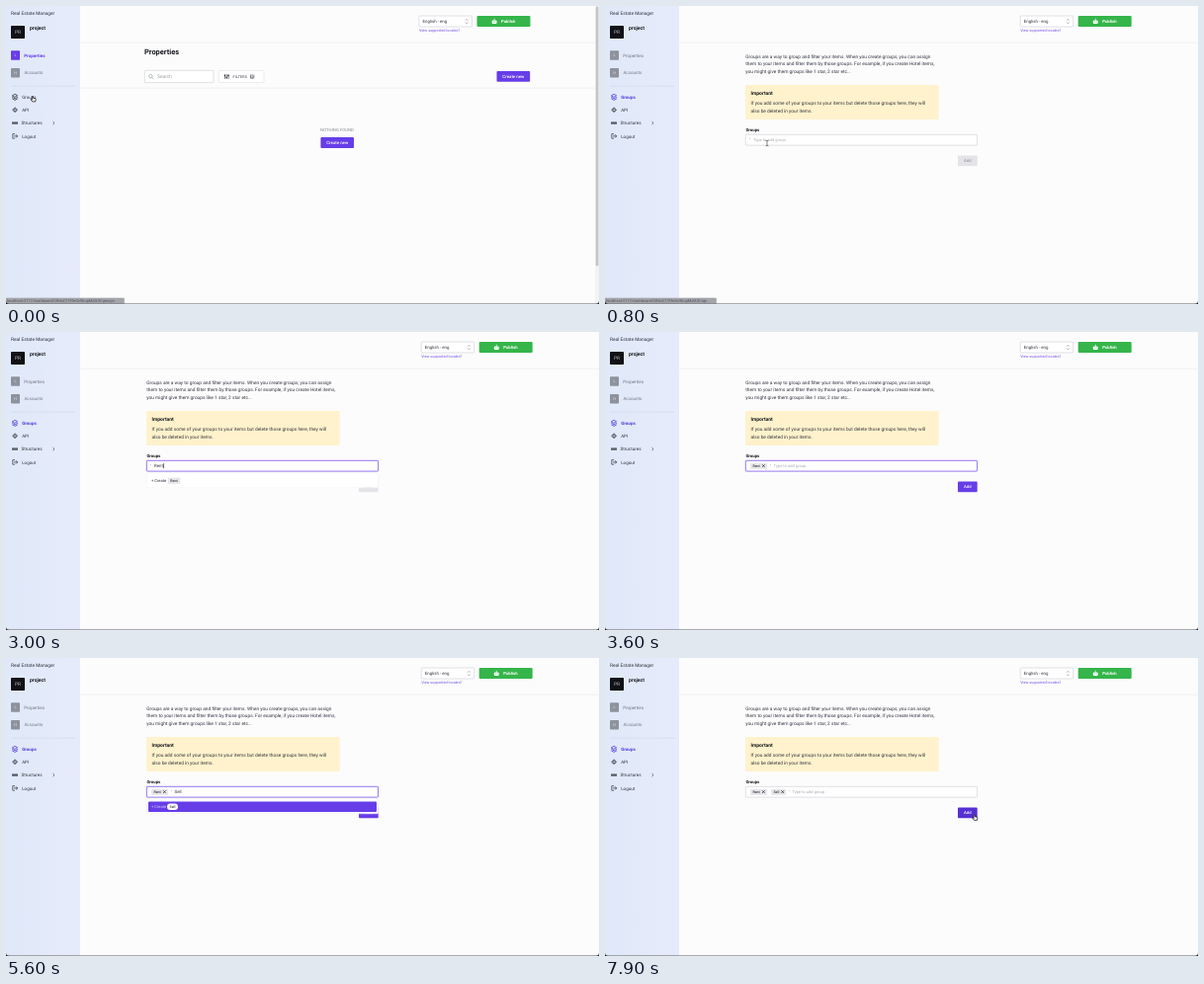
Recreate the animation shown at these times as an HTML page. Size 600 by 302 pixels, loop 8 s.

```html
<!DOCTYPE html>
<html lang="en">
<head>
<meta charset="utf-8">
<title>Group manager</title>
<style>
  html, body { margin: 0; width: 100%; height: 100%; overflow: hidden; background: #fcfcfd; }
  svg { display: block; width: 100vw; height: 100vh; }
  text { font-family: Roboto, Arial, sans-serif; text-rendering: geometricPrecision; white-space: pre; }
</style>
</head>
<body>
<svg id="stage" viewBox="0 0 600 302" xmlns="http://www.w3.org/2000/svg"></svg>
<script>
const LOOP = 8000;
const PURPLE = '#673de8', INK = '#30333b', GREY = '#6f7580', LINE = '#d3d5da';

// Markup helpers
const attrs = o => Object.entries(o).map(([k, v]) => ` ${k}="${v}"`).join('');
const rect = (x, y, width, height, fill, more = {}) =>
  `<rect${attrs({ x, y, width, height, fill, ...more })}/>`;
const text = (x, y, size, str, fill = INK, weight = 400, more = {}) =>
  `<text${attrs({ x, y, 'font-size': size, fill, 'font-weight': weight, ...more })}>${str}</text>`;
const path = (d, stroke = INK, width = 0.7, fill = 'none') =>
  `<path${attrs({ d, stroke, 'stroke-width': width, fill, 'stroke-linejoin': 'round', 'stroke-linecap': 'round' })}/>`;
const group = (id, body) => `<g id="${id}">${body}</g>`;
const outlined = (x, y, w, h, id) =>
  rect(x, y, w, h, '#fff', { stroke: LINE, 'stroke-width': 0.7, rx: 0.8, ...(id && { id }) });
const mid = { 'text-anchor': 'middle' };

const button = (x, y, w, h, label, fill = PURPLE) =>
  rect(x, y, w, h, fill, { rx: 1 }) +
  text(x + w / 2, y + h / 2 + 1.5, 4.4, label, '#fff', 500, mid);

const tile = (id, y, letter, fill) =>
  rect(5, y, 9, 9.5, fill, { rx: 0.8, id }) +
  text(9.5, y + 6.1, 3.8, letter, '#e4e4ee', 400, mid);

const chip = (id, x, w, label) => group(id,
  rect(x, 132.7, w, 6.2, '#e8e8ec', { rx: 1 }) +
  text(x + 2.4, 137.1, 3.6, label, INK, 500) +
  path(`M${x + w - 4.6} 134.6l2 2m0 -2l-2 2`, '#222', 0.75));

const sidebar =
  rect(0, 0, 75, 302, 'url(#side)') +
  text(5, 8.8, 4.8, 'Real Estate Manager') +
  rect(5, 20, 14, 13, '#111216', { rx: 0.8 }) +
  text(12, 28.3, 4.8, 'PR', '#b9bac0', 400, mid) +
  text(24, 23.8, 5.1, 'project', '#16181d', 700) +
  tile('propTile', 45.2, 'L', PURPLE) +
  text(18.2, 51.7, 4.55, 'Properties', PURPLE, 700, { id: 'propText' }) +
  tile('accTile', 63, 'H', '#8d929c') +
  text(18.4, 69.4, 4.5, 'Accounts', GREY) +
  rect(5, 80.8, 65, 0.5, '#cbd1e2') +
  group('groupIcon', path('M6.6 90.7l2.5 -1.4l2.5 1.4l-2.5 1.4zM6.6 92.4l2.5 1.4l2.5 -1.4M6.6 94l2.5 1.4l2.5 -1.4', 'currentColor', 0.8)) +
  text(16.2, 94, 4.5, 'Groups', INK, 400, { id: 'groupText' }) +
  path('M8.2 103.9l.9 -1.2l.9 1.2zM8.2 106.7l.9 1.2l.9 -1.2zM7.7 104.4l-1.2 .9l1.2 .9zM10.5 104.4l1.2 .9l-1.2 .9z', INK, 0.6) +
  text(16.2, 107, 4.5, 'API') +
  [6.3, 8.3, 10.3].map(x => rect(x, 117.4, 1.4, 2.4, '#24262c')).join('') +
  text(15.5, 120.2, 4.6, 'Structures') +
  path('M47.9 117.5l1.1 1.1l-1.1 1.1', INK, 0.7) +
  path('M8.6 129.6h-1.8v4.6h1.8M8.3 131.9h3.3m-1.3 -1.4l1.4 1.4l-1.4 1.4', INK, 0.7) +
  text(16.2, 133.6, 4.5, 'Logout');

const header =
  rect(75, 36.8, 525, 0.5, '#e3e4e8') +
  group('tools',
    outlined(418, 10, 53.5, 11) +
    text(421.6, 17.1, 4.35, 'English - eng') +
    path('M465 14.5l1.1 -1.2l1.1 1.2M465 16.7l1.1 1.2l1.1 -1.2', '#777', 0.5) +
    rect(476.5, 10, 54, 11, '#35b54a', { rx: 1 }) +
    rect(491.6, 14.6, 5, 3.3, '#fff', { rx: 1.2 }) +
    path('M494.1 13v1.4', '#fff', 0.7) +
    rect(493, 15.6, 0.7, 1, '#35b54a') + rect(494.6, 15.6, 0.7, 1, '#35b54a') +
    text(501, 17, 4.25, 'Publish', '#fff', 700) +
    text(418, 26.2, 3.8, 'View supported locales?', '#7552e6'));

const listPage = group('listPage',
  text(140, 48.8, 7.45, 'Properties', '#16181d', 700) +
  outlined(140.3, 65.3, 69.7, 12.4) +
  `<circle cx="146.4" cy="71.2" r="1.7" fill="none" stroke="#8b9099" stroke-width=".6"/>` +
  path('M147.7 72.5l1.5 1.5', '#8b9099', 0.6) +
  text(153, 73.3, 4.9, 'Search', '#9a9fa8') +
  rect(215.3, 65.5, 45.7, 12, '#fff', { stroke: '#e4e5e9', 'stroke-width': 0.7, rx: 1 }) +
  [221.5, 223.3, 225.1].map((x, i) =>
    path(`M${x} 69.4v4.2`, INK, 0.6) + rect(x - 0.7, 70 + (i % 2) * 1.8, 1.4, 1.2, INK)).join('') +
  text(229.5, 72.9, 3.7, 'FILTERS', INK, 400, { 'letter-spacing': 0.2 }) +
  path('M247.5 70v3m1.6 -3.5v4l-.7 -.8m.7 .8l.7 -.8M250.8 70v3', INK, 0.6) +
  button(496.5, 66, 33.7, 10.8, 'Create new') +
  rect(75, 82.8, 521, 0.5, '#e3e4e8') +
  text(335, 127, 4.3, 'NOTHING FOUND', '#868b94', 400, mid) +
  button(318.4, 133, 33.6, 11, 'Create new') +
  rect(596, 0, 4, 302, '#f3f3f4') +
  rect(596.8, 0.5, 2.6, 263, '#c3c3c5', { rx: 1.3 }));

const lines = (x, y, list) => list.map((s, i) => text(x, y + i * 7.5, 4.8, s)).join('');

const groupPage = group('groupPage',
  lines(142.3, 52.8, [
    'Groups are a way to group and filter your items. When you create groups, you can assign',
    'them to your items and filter them by those groups. For example, if you create Hotel items,',
    'you might give them groups like 1 star, 2 star etc...']) +
  rect(142, 80, 195.6, 35, '#fff2cc', { rx: 1 }) +
  text(147.5, 90.2, 5, 'Important', '#16181d', 700) +
  lines(147.5, 100.4, [
    'If you add some of your groups to your items but delete those groups here, they will',
    'also be deleted in your items.']) +
  text(142.4, 127.3, 4.3, 'Groups', '#16181d', 700) +
  rect(357, 151.6, 19.7, 10.6, '#e4e4e8', { rx: 1, id: 'addBox' }) +
  text(366.8, 158.4, 4.2, 'Add', '#9b9da5', 500, { ...mid, id: 'addText' }) +
  outlined(142.3, 130.3, 234.3, 10.8, 'field') +
  chip('rentChip', 147, 17, 'Rent') +
  chip('sellChip', 168, 15.3, 'Sell') +
  group('entry',
    rect(-3.6, 134, 0.5, 1.1, '#9a9ca4') +
    text(0, 137.2, 4.1, 'Type to add group', '#a7abb3', 400, { id: 'hint' }) +
    text(0, 137.3, 4.4, '', INK, 400, { id: 'typed' }) +
    rect(0, 133.2, 0.6, 5, '#111', { id: 'caret' })) +
  group('panel',
    rect(142.2, 142.8, 234.5, 15, '#fff', { stroke: '#f0f0f3', 'stroke-width': 0.5, rx: 1 }) +
    group('option',
      rect(144, 145.5, 231, 10.6, PURPLE, { rx: 1, id: 'row' }) +
      text(147, 152.3, 4.1, '+ Create', INK, 400, { id: 'create' }) +
      rect(163, 147.6, 8, 6.4, '#e8e8ec', { id: 'badge' }) +
      text(165.5, 152, 3.6, '', INK, 500, { id: 'badgeText' }))));

const status = group('status',
  rect(-1, 295.7, 120.8, 7, '#a3a5aa', { rx: 1, id: 'statusBox' }) +
  text(1, 300.2, 3.9, '', '#53555b', 400, { id: 'statusText' }));

const frame =
  rect(0, 301.4, 600, 0.6, '#77787c') +
  `<path d="M0 298.5v3.5h3.5q-3.5 0 -3.5 -3.5zM600 298.5v3.5h-3.5q3.5 0 3.5 -3.5z" fill="#111"/>`;

const pointer = group('pointer',
  group('arrow', path('M0 0v5l1.2 -1l.8 1.8l.9 -.4l-.8 -1.8h1.6z', '#fff', 0.35, '#111')) +
  group('hand', path('M-.5 0q.6 -.5 1 .1v1.7l2 .4q.7 .2 .6 1l-.4 2.2h-3l-1.7 -2.2q.2 -.7 1.1 .1z', '#111', 0.75, '#fff')) +
  group('beam', path('M-1 -2.6q.9 0 1 .6q.1 -.6 1 -.6M0 -2v4.2M-1 2.8q.9 0 1 -.6q.1 .6 1 .6', '#222', 0.55)));

const stage = document.getElementById('stage');
stage.innerHTML =
  `<defs><linearGradient id="side"><stop stop-color="#e0e9f9"/><stop offset="1" stop-color="#e6ebfb"/></linearGradient></defs>` +
  rect(0, 0, 600, 302, '#fcfcfd') + sidebar + header + listPage + groupPage + status + frame + pointer;

const el = {};
stage.querySelectorAll('[id]').forEach(n => el[n.id] = n);
const show = (id, on) => el[id].setAttribute('visibility', on ? 'inherit' : 'hidden');
const set = (id, o) => Object.entries(o).forEach(([k, v]) => el[id].setAttribute(k, v));
const within = (t, a, b) => t >= a && t < b;

// Event times
const OPEN = 200, FOCUS = 1050, ARROW_DOWN = 3300, RENT_DONE = 3600, SELL_START = 4300,
  SELL_DONE = 6200, BLUR = 7000;
const rentKeys = [2000, 2150, 2300, 2450];
const sellKeys = [SELL_START, 5000, 5150, 5300];
const typedAt = (word, keys, t) => word.slice(0, keys.filter(k => t >= k).length);

function entryText(t) {
  if (t < RENT_DONE) return typedAt('Rent', rentKeys, t);
  if (t < SELL_DONE) return typedAt('Sell', sellKeys, t);
  return '';
}

function caretOn(t) {
  if (!within(t, FOCUS, BLUR)) return false;
  if (within(t, SELL_START, 4800) || within(t, 5000, 5600)) return true;
  if (within(t, 4800, SELL_DONE)) return false;
  return Math.floor((t - 1000) / 500) % 2 === 0;
}

// Pointer stops: time, x, y
const stops = [
  [0, 27, 91.5], [150, 27, 91.5], [780, 164, 139], [6400, 164, 139],
  [6980, 215.6, 195.4], [7200, 215.6, 195.4], [7700, 381, 157.5], [7880, 373.8, 159]
];

function pointerAt(t) {
  const i = stops.findIndex(s => s[0] > t);
  if (i < 0) return stops[stops.length - 1].slice(1);
  const [t0, x0, y0] = stops[i - 1], [t1, x1, y1] = stops[i];
  const p = (t - t0) / (t1 - t0), e = p * p * (3 - 2 * p);
  return [x0 + (x1 - x0) * e, y0 + (y1 - y0) * e];
}

function drawPointer(t, x, y, overAdd) {
  const visible = t < rentKeys[0] || t >= 6400;
  const overField = t >= OPEN && within(x, 142, 377) && within(y, 130, 141.5);
  const hand = overAdd || (x < 70 && within(y, 86, 98));
  set('pointer', { transform: `translate(${x} ${y})` });
  show('beam', visible && overField);
  show('hand', visible && hand);
  show('arrow', visible && !overField && !hand);
}

function drawEntry(t) {
  const word = entryText(t);
  const x = t < RENT_DONE ? 150 : t < SELL_DONE ? 170.6 : 189.4;
  const focused = within(t, FOCUS, BLUR);
  const picked = t >= ARROW_DOWN;
  set('entry', { transform: `translate(${x} 0)` });
  set('field', { stroke: focused ? PURPLE : LINE });
  el.typed.textContent = el.badgeText.textContent = word;
  set('caret', { x: word ? el.typed.getComputedTextLength() + 0.2 : 0 });
  show('caret', caretOn(t));
  show('hint', !word);
  show('rentChip', t >= RENT_DONE);
  show('sellChip', t >= SELL_DONE);

  show('panel', within(t, FOCUS, RENT_DONE) || within(t, SELL_START, SELL_DONE));
  show('option', word);
  show('row', word && picked);
  set('create', { fill: picked ? '#d9ccff' : INK });
  set('badge', {
    x: picked ? 163 : 164, rx: picked ? 3.2 : 1,
    width: el.badgeText.getComputedTextLength() + 5,
    fill: picked ? '#fff' : '#e8e8ec'
  });
  set('badgeText', { x: picked ? 165.5 : 166.3 });
}

function draw(t) {
  const opened = t >= OPEN;
  const [x, y] = pointerAt(t);
  const overAdd = opened && within(x, 357, 377) && within(y, 151.6, 162.2);

  el.listPage.style.display = opened ? 'none' : '';
  el.groupPage.style.display = opened ? '' : 'none';
  set('tools', { transform: `translate(${opened ? 2.2 : 0} 0)` });
  set('propTile', { fill: opened ? '#8d929c' : PURPLE });
  set('propText', { fill: opened ? GREY : PURPLE, 'font-weight': opened ? 400 : 700 });
  set('groupText', { fill: opened ? '#5139d8' : INK, 'font-weight': opened ? 700 : 400 });
  set('groupIcon', { color: opened ? '#5139d8' : INK });

  show('status', t < 1100);
  set('statusBox', { width: opened ? 113.8 : 120.8 });
  el.statusText.textContent =
    'localhost:3117/dashboard/GRvlxC1YI9eGc9bupMx0U5/' + (opened ? 'api' : 'groups');

  const active = t >= RENT_DONE;
  set('addBox', { fill: overAdd ? '#5630d2' : active ? PURPLE : '#e4e4e8' });
  set('addText', { fill: active ? '#fff' : '#9b9da5' });

  drawEntry(t);
  drawPointer(t, x, y, overAdd);
}

const start = performance.now();
function tick() {
  draw((performance.now() - start) % LOOP);
  requestAnimationFrame(tick);
}
tick();
</script>
</body>
</html>
```
